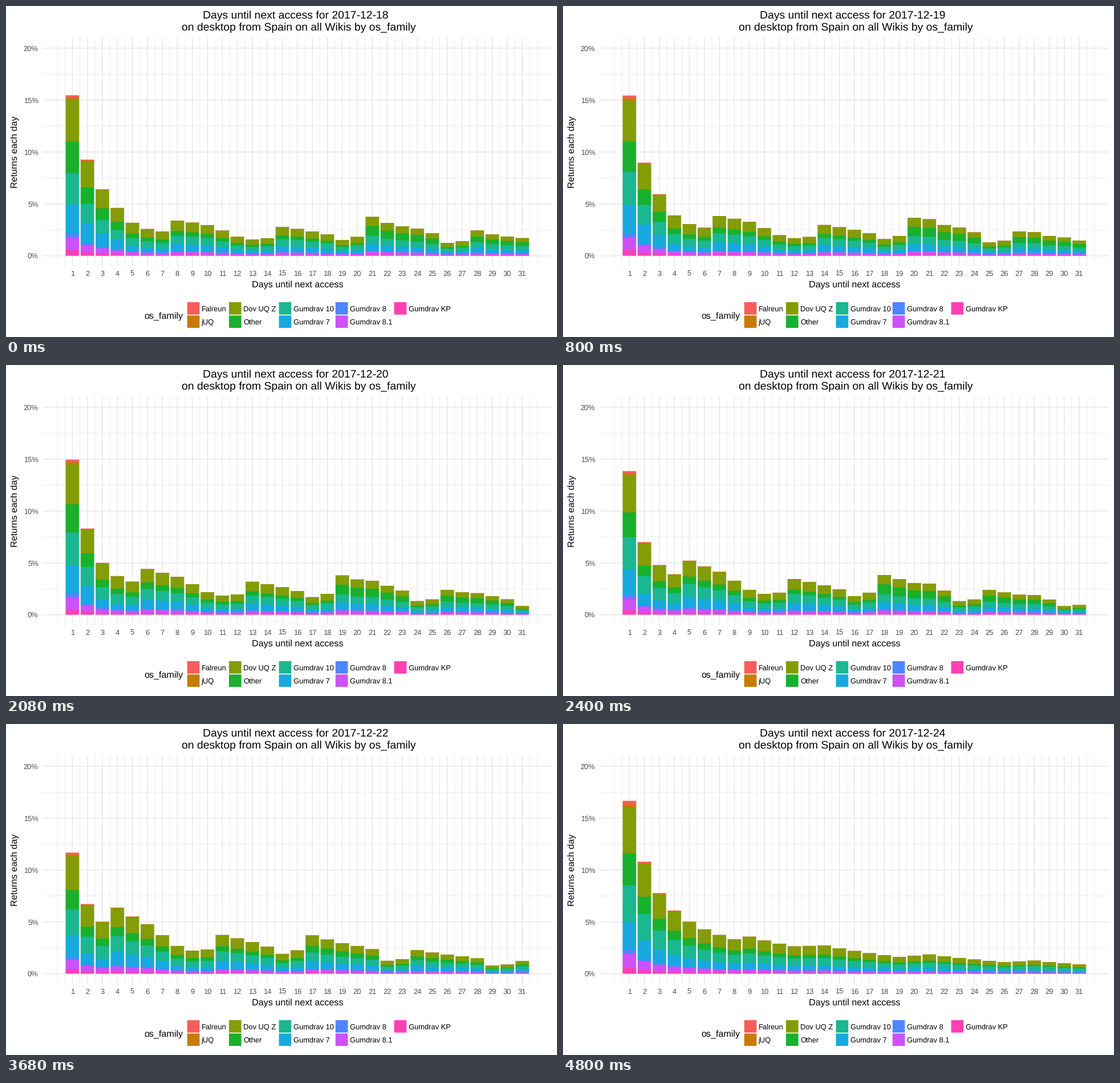
These frames come from a looping animation (966 by 580 pixels, 5.6 s). A matplotlib script:

```python
import numpy as np
import matplotlib.pyplot as plt
from matplotlib.animation import FuncAnimation
from matplotlib.collections import LineCollection, PolyCollection
from matplotlib.patches import Rectangle

W, H, DPI = 966, 580, 100
DAYS, SPAN = 7, 31           # start dates shown, days followed after each
X0, STEP = 90.1, 26.29       # pixel position of day 0, pixels per day
Y0, UNIT = 437.6, 18.18      # pixel position of 0%, pixels per percent
BASE, SMALL, BIG = 16.15, 12.9, 19.4

plt.rcParams.update({"font.family": "Liberation Sans", "text.hinting": "none"})

# Legend order; bars stack from the last family up to the first.
FAMILIES = [
    ("Falreun", "#F55E5B"), ("jUQ", "#C67C06"),
    ("Dov UQ Z", "#849C06"), ("Other", "#18B02C"),
    ("Gumdrav 10", "#1BB790"), ("Gumdrav 7", "#17A9DE"),
    ("Gumdrav 8", "#4E86FF"), ("Gumdrav 8.1", "#CC51FA"),
    ("Gumdrav KP", "#FF3FB4"),
]

# Dates count from 1 December; the working year restarts on 8 January.
RESTART = 39
HOLIDAY_WEEK = (0.68, 1, 1, 0.97, 0.9, 0.76, 0.73)      # Monday first
WORK_WEEK = (1.06, 1, 0.94, 0.9, 0.78, 0.46, 0.54)

# Key points (date, activity) for people first seen on workdays and weekends.
WORK_LEVEL = [(19, 23.2), (24, 23), (26, 28.7), (28, 32), (31, 29), (33, 43),
              (36, 42), (37, 39), (38, 51), (39, 71), (45, 71), (46, 61),
              (52, 58), (53, 42)]
WEEKEND_LEVEL = [(24, 23), (26, 27), (32, 28.3), (33, 34), (36, 33),
                 (38, 39.5), (43, 31.5), (45, 40), (50, 29.5), (52, 36),
                 (55, 28)]


def total(day, n):
    """Percent returning n days later: site activity over elapsed time."""
    date = 18 + day + n
    if day >= 5:
        return np.interp(date, *zip(*WEEKEND_LEVEL)) / (n + 0.5)
    late = date >= RESTART
    week = WORK_WEEK if late else HOLIDAY_WEEK
    activity = np.interp(date, *zip(*WORK_LEVEL)) * week[(date - 18) % 7]
    if late:
        activity *= 1 - 0.14 * (day / 4) ** 3
        if n % 7 == 0:
            activity *= 1.07
    return activity / (n + 0.5)


def middle_cuts(day, n):
    """Tops of the 7, 10 and Other segments as shares of the bar."""
    date = 18 + day + n
    off = (date - 18) % 7 >= 5 or date in (25, 32)
    first = n == 1
    if day >= 5:
        return 0.297, 0.53 + 0.002 * n - 0.02 * first, 0.675 + 0.022 / n
    seven = 0.317 if first else 0.29 if off else 0.335
    if off:
        return seven, 0.53 + 0.0012 * n, 0.675 + 0.015 * first
    if date <= 22:
        return seven, 0.54 + 0.008 * day - 0.025 * first, 0.712
    if date < RESTART:
        return seven, 0.567 + 0.002 * (date - 26), 0.705
    friday = day == 4
    ten = 0.516 + 0.003 * (date - RESTART) + 0.04 * friday
    return seven - 0.022 * (not friday), ten, 0.765 - 0.03 * friday


def cuts(day, n):
    """Segment edges from top to bottom as shares of the bar."""
    low = (0.14, 0.115, 0.034) if n == 1 else (0.13, 0.112, 0.033)
    seven, ten, other = middle_cuts(day, n)
    rest = (0.04 if day >= 5 else 0.03) * n ** -0.8
    return (1, 1 - 0.55 * rest, 1 - rest, other, ten, seven, *low, 0)


def segments(day):
    """Quads per family; each reaches 1 px down to hide the seam."""
    quads = [[] for _ in FAMILIES]
    for n in range(1, SPAN + 1):
        left = X0 + (n - 0.45) * STEP
        right = left + 0.9 * STEP
        height = UNIT * total(day, n)
        edges = [Y0 - height * c for c in cuts(day, n)]
        for quad, top, bottom in zip(quads, edges, edges[1:]):
            low = min(bottom + 1, Y0)
            quad.append([(left, top), (right, top), (right, low), (left, low)])
    return quads


fig = plt.figure(figsize=(W / DPI, H / DPI), dpi=DPI, facecolor="white")
ax = fig.add_axes([0, 0, 1, 1])
ax.set(xlim=(0, W), ylim=(H, 0))
ax.axis("off")


def label(x, y, text, size, ha="left", color="black", **kw):
    return ax.text(x, y, text, fontsize=size * 72 / DPI, ha=ha,
                   va="baseline", color=color, **kw)


def grid(xs, ys, width):
    left, right = X0 - 0.995 * STEP, X0 + 32.995 * STEP
    top, bottom = Y0 - 21 * UNIT, Y0 + UNIT
    lines = [[(left, Y0 - y * UNIT), (right, Y0 - y * UNIT)] for y in ys]
    lines += [[(X0 + x * STEP, top), (X0 + x * STEP, bottom)] for x in xs]
    grid_lines = LineCollection(lines, colors="#E8E8E8",
                                linewidths=width * 72 / DPI, zorder=1)
    grid_lines.set_snap(False)
    ax.add_collection(grid_lines)


grid([0, *np.arange(0.5, 32), 32], np.arange(2.5, 20, 5), 0.8)
grid(range(1, SPAN + 1), range(0, 21, 5), 1.55)

bars = []
for i, (_, color) in enumerate(FAMILIES):
    bar = PolyCollection([], facecolors=color, edgecolors="none", zorder=2 + i)
    bar.set_snap(False)
    ax.add_collection(bar, autolim=False)
    bars.append(bar)

for n in range(1, SPAN + 1):
    label(X0 + n * STEP, 472.6, str(n), SMALL, "center", "#4D4D4D")
for p in range(0, 21, 5):
    label(56.6, Y0 - p * UNIT + 4.7, f"{p}%", SMALL, "right", "#4D4D4D")

title = label(508, 22.3, "", BIG, "center")
label(513.5, 43.2, "on desktop from Spain on all Wikis by os_family", BIG, "center")
label(510.8, 492.2, "Days until next access", BASE, "center")
label(19.4, 255.8, "Returns each day", BASE, "center",
      rotation=90, rotation_mode="anchor")

label(242.5, 547.4, "os_family", BASE)
for i, (name, color) in enumerate(FAMILIES):
    x = (317.7, 390.9, 478.5, 577.7, 680.5)[i // 2]
    y = 519 + 23.3 * (i % 2)
    ax.add_patch(Rectangle((x, y), 21.7, 21.7, facecolor=color,
                           edgecolor="none", snap=False))
    label(x + 25, y + 15.5, name, SMALL)


def draw(day):
    title.set_text(f"Days until next access for 2017-12-{18 + day}")
    for bar, quads in zip(bars, segments(day)):
        bar.set_verts(quads)
    return [title, *bars]


anim = FuncAnimation(fig, draw, frames=DAYS, interval=800,
                     repeat=True, repeat_delay=0, blit=False)
plt.show()
```
